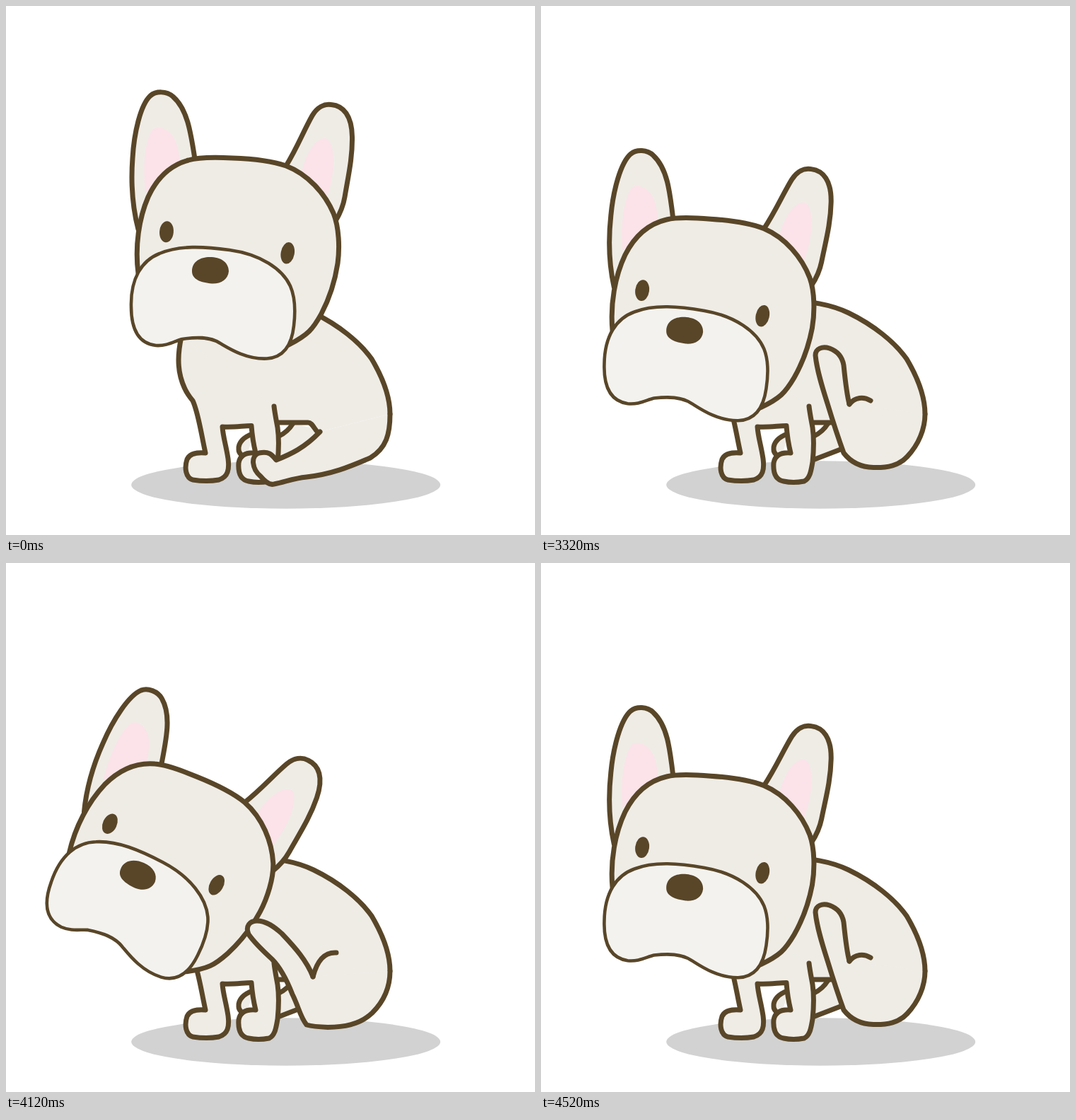
An HTML page for the animation above (5.02 s loop, 748 px wide and 748 px high).

```html
<!DOCTYPE html>
<html lang="en">
<head>
<meta charset="utf-8">
<title>Scratching puppy</title>
<style>
  html, body { margin: 0; width: 100%; height: 100%; overflow: hidden; background: #fff; }
  svg { display: block; width: 100%; height: 100%; }
  .line { stroke: #594628; stroke-width: 7; stroke-linecap: round; stroke-linejoin: round; fill: none; }
  .fur { fill: #efece6; }
  .pink { fill: #fbe3e9; }
  .dark { fill: #594628; }
  .muzzle { fill: #f3f2ef; stroke-width: 4.6; }
</style>
</head>
<body>
<svg viewBox="0 0 748 748">
  <ellipse cx="395.7" cy="677" rx="218.5" ry="33.7" fill="#d2d2d2"/>

  <!-- far hind leg -->
  <path class="fur" d="M386 608C395 604 401 598 406 590L445 600 425 626 387 642Z"/>
  <path class="line" d="M386 608C395 604 401 598 406 590M387 641L426 626"/>
  <path class="line fur" d="M349 605C336 609 328 618 329 627C329 633 334 636 340 640"/>

  <!-- body and front legs -->
  <path class="fur" d="M350 416C380 418 408 421 435 434C470 451 500 475 517 499C533 526 543 552 543 577L444 602 427 589H383L270 560 248 468Z"/>
  <path class="line" d="M350 416C380 418 408 421 435 434C470 451 500 475 517 499C533 526 543 552 543 577"/>
  <path class="line" d="M386 589H427C433 589 435 597 441 603"/>
  <path class="line fur" d="M248 468C243 490 243 510 247 525C251 540 257 550 264 558C272 575 276 605 282 632C270 631 260 632 256 641C252 653 254 667 264 670C277 672 290 672 301 670C314 666 316 655 314 640C311 620 307 610 306 595C320 596 333 594 347 593.5C348 607 350 620 353 632C340 631 331 635 329 646C328 660 332 670 343 672C352 674 362 674 372 672C381 668 382 655 384 645C386 625 386 610 384 596C382 585 380 575 379 566"/>

  <g id="head">
    <path class="line fur" d="M187 316C179 285 176 255 179 215C181 180 190 140 204 127C212 120 227 120 236 128C256 145 261 177 267 216"/>
    <path class="pink" d="M197 264C193 225 197 190 207 175C215 168 231 173 239 190C245 205 246 220 247 232Z"/>
    <path class="line fur" d="M396 226C412 200 421 176 433 155C440 143 450 138 460 139.5C477 141 489 155 489.5 185C490 215 484 240 479 270C477 282 472 294 466 304"/>
    <path class="pink" d="M416 245C420 220 432 190 450 187C461 186 465 212 462 235C460 250 457 262 453 272Z"/>
    <path class="line fur" d="M187 378C182 340 188 300 201 270C213 244 232 225 258 218C275 213 300 214 320 215C350 216 376 219 396 226C427 238 451 265 463 293C471 313 472 342 469 364C465 390 457 414 446 435C434 457 427 465 400 479"/>
    <g id="open" class="dark">
      <ellipse cx="227" cy="319.3" rx="9.9" ry="15" transform="rotate(5 227 319)"/>
      <ellipse cx="398.3" cy="349.3" rx="9.6" ry="15.4" transform="rotate(10 398 349)"/>
    </g>
    <g id="shut" class="dark">
      <path d="M216.5 326C218 319 232 313 239 315.5C241 322 224 329.5 216.5 326Z"/>
      <path d="M386.5 342.5C394 339.5 408 345 410.5 353.5C406 359 388 350 386.5 342.5Z"/>
    </g>
    <path class="line muzzle" d="M177 425C176 385 192 360 217 350C245 338 280 340 316 345C360 351 391 372 402 396C409 412 409 435 407 452C404 480 392 497 369 498.5C340 500 315 484 303 477C288 467 268 468 249 471C238 474 228 481 212 480C186 477 177 455 177 425Z"/>
    <path class="dark" d="M263 375C263 360 277 354 291 355C306 356 315 364 315 375C314 387 304 393 291 392.5C276 391 263 387 263 375Z"/>
  </g>

  <path id="leg" class="line fur"/>
  <path id="fold" class="line"/>
</svg>
<script>
  const get = id => document.getElementById(id);
  const [head, open, shut, leg, fold] = ['head', 'open', 'shut', 'leg', 'fold'].map(get);
  const LOOP = 5020;

  // nose: where the nose sits; tilt: head angle in degrees
  const sit = {
    nose: '289 374', tilt: 0,
    leg: 'M543 577C543 605 538 625 515 639C485 652 460 662 425 666C405 668 395 673 379 676C372 678 366 672 360 665C348 655 345 636 358 632C371 629 376 634 382 642C402 634 422 625 444 602',
    fold: ''
  };
  const lean = {
    nose: '203.2 459', tilt: 2,
    leg: 'M543 577C543 598 534 620 518 637C506 650 490 653 470 652.5C452 652 438 645 428 632C420 610 412 585 405 562C398 540 390 515 388 494C388 484 398 481 408 484C419 488 426 496 428 508C430 528 432 548 436 563',
    fold: 'M436 563C444 553 456 552 466 558'
  };
  const scratch = {
    nose: '186.6 441.3', tilt: 19.9,
    leg: 'M543 577C543 599 534 620 518 636C499 654 475 656 455 656.5C442 656 432 655 425 653C416 642 414 628 405 610C398 592 388 572 376 560C364 549 352 538 343 525C338 513 345 506 355 506C368 506 379 514 390 524C409 544 425 562 434 585',
    fold: 'M434 585C440 562 450 550 467 551'
  };
  const blink = { ...sit, blink: true };

  const steps = [
    [0, sit], [2200, blink], [2320, sit], [3320, lean],
    [3820, scratch], [3920, lean], [4120, scratch], [4220, lean],
    [4420, scratch], [4520, lean]
  ];

  let shown;
  function show(pose) {
    if (pose === shown) return;
    shown = pose;
    head.setAttribute('transform', `translate(${pose.nose}) rotate(${pose.tilt}) translate(-289 -374)`);
    leg.setAttribute('d', pose.leg);
    fold.setAttribute('d', pose.fold);
    open.style.display = pose.blink ? 'none' : '';
    shut.style.display = pose.blink ? '' : 'none';
  }

  function tick() {
    const t = performance.now() % LOOP;
    show(steps.findLast(([at]) => at <= t)[1]);
    requestAnimationFrame(tick);
  }
  tick();
</script>
</body>
</html>
```
